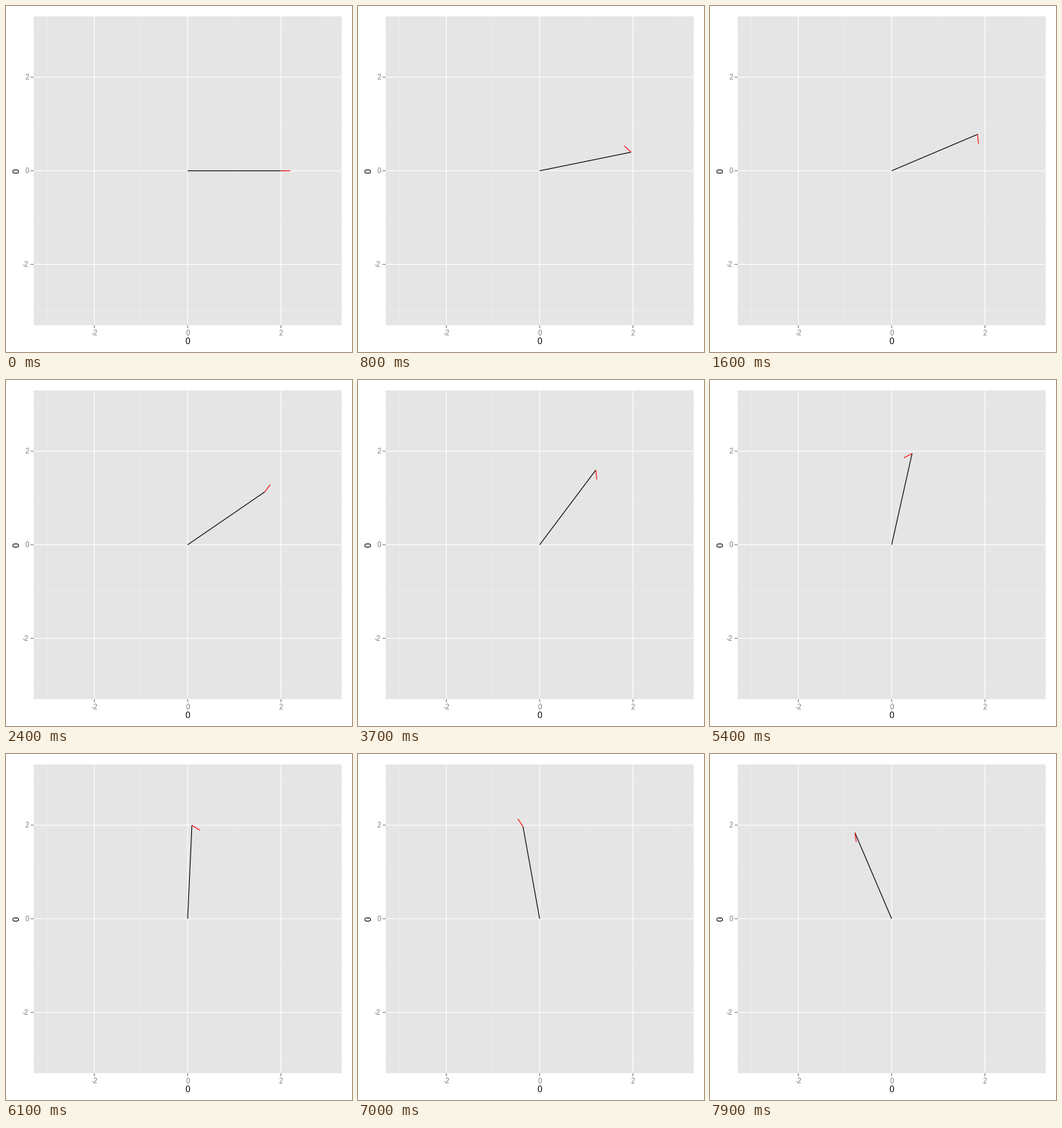
Animation, 480 px wide and 480 px high, one loop 8000 ms. Source, as a matplotlib script:

```python
import numpy as np
import matplotlib.pyplot as plt
from matplotlib.animation import FuncAnimation
from matplotlib.patches import Rectangle

# At 72 dpi one point is one pixel.
SIZE, DPI = 480, 72
FRAMES, INTERVAL = 80, 100
LEFT, RIGHT, TOP, BOTTOM = 38.4, 465.6, 14.4, 442.8
LIMIT = 3.3
TICK = 4.25
LINE = 1.07
GREY = "#7f7f7f"

ARM, HAND = 2.0, 0.2
ARM_STEP, HAND_STEP = 0.025, 0.3

plt.rcParams["font.family"] = "Liberation Sans"
plt.rcParams["axes.unicode_minus"] = False

fig = plt.figure(figsize=(SIZE / DPI, SIZE / DPI), dpi=DPI, facecolor="white")
ax = fig.add_axes([0, 0, 1, 1])
ax.set_xlim(0, SIZE)
ax.set_ylim(SIZE, 0)
ax.axis("off")


def px(x):
    return LEFT + (x + LIMIT) / (2 * LIMIT) * (RIGHT - LEFT)


def py(y):
    return BOTTOM - (y + LIMIT) / (2 * LIMIT) * (BOTTOM - TOP)


def line(xs, ys, color, width=LINE, z=2):
    return ax.plot(xs, ys, color=color, lw=width, zorder=z, snap=False,
                   solid_capstyle="butt", solid_joinstyle="round")[0]


def grid(values, color, width, z):
    for v in values:
        line([px(v)] * 2, [TOP, BOTTOM], color, width, z)
        line([LEFT, RIGHT], [py(v)] * 2, color, width, z)


ax.add_patch(Rectangle((LEFT, TOP), RIGHT - LEFT, BOTTOM - TOP,
                       fc="#e5e5e5", ec="none", lw=0, zorder=0, snap=False))
grid((-3, -1, 1, 3), "#f2f2f2", LINE / 2, 1)
grid((-2, 0, 2), "white", LINE, 2)

for v in (-2, 0, 2):
    line([px(v)] * 2, [BOTTOM, BOTTOM + TICK], GREY)
    line([LEFT - TICK, LEFT], [py(v)] * 2, GREY)
    ax.text(px(v), 457, str(v), size=9.6, color=GREY, ha="center", va="baseline")
    ax.text(31.6, py(v) + 3.4, str(v), size=9.6, color=GREY, ha="right", va="baseline")

ax.text(px(0), 469, "0", size=12, ha="center", va="baseline")
ax.text(15.8, py(0), "0", size=12, rotation=90, ha="center", va="center")

arm = line([], [], "black", z=4)
hand = line([], [], "red", z=5)


def update(i):
    a, b = ARM_STEP * i, HAND_STEP * i
    x, y = ARM * np.cos(a), ARM * np.sin(a)
    u, v = x + HAND * np.cos(b), y + HAND * np.sin(b)
    arm.set_data([px(0), px(x)], [py(0), py(y)])
    hand.set_data([px(x), px(u)], [py(y), py(v)])
    return arm, hand


anim = FuncAnimation(fig, update, frames=FRAMES, interval=INTERVAL,
                     repeat=True, repeat_delay=0, blit=False)
plt.show()
```
